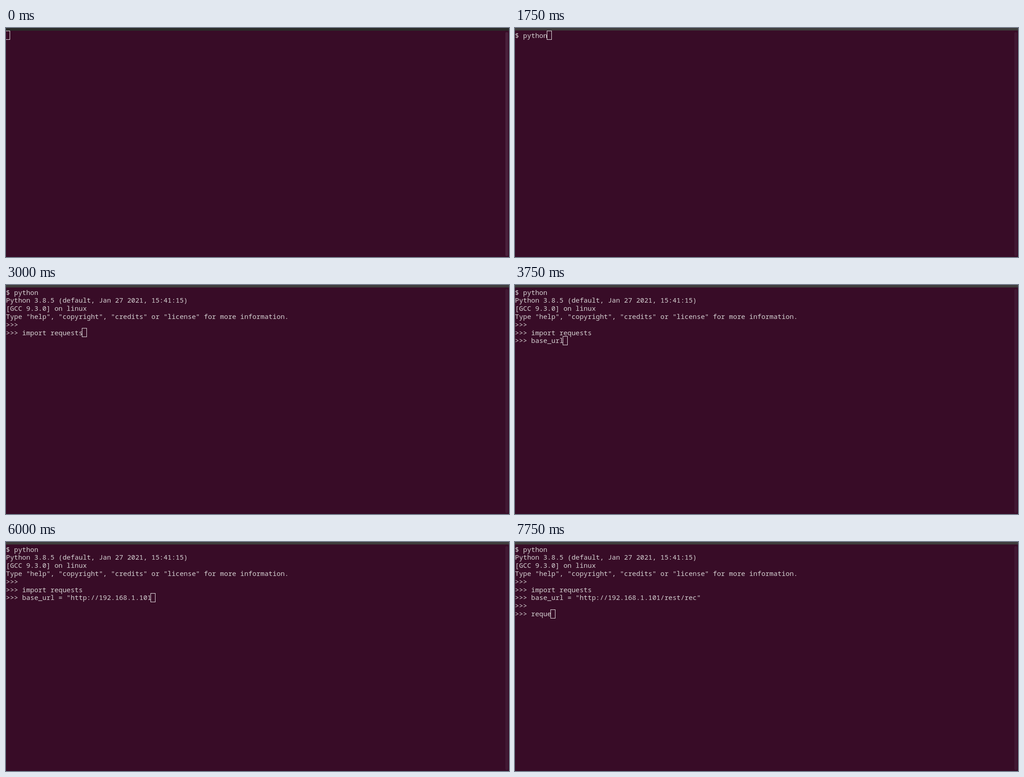
Recreate the animation shown at these times as an HTML page with a canvas. Size 1107x506 px, loop 8 s.

```html
<!DOCTYPE html>
<html lang="en">
<head>
<meta charset="utf-8">
<title>Terminal session</title>
<style>
  html, body { margin: 0; width: 100%; height: 100%; overflow: hidden; background: #380c27; }
  canvas { display: block; }
</style>
</head>
<body>
<canvas width="1107" height="506"></canvas>
<script>
const ctx = document.querySelector('canvas').getContext('2d');
const LOOP = 8000, CELL = 8.889, ROW = 17.83;

// Time in ms and the text added to the terminal at that moment
const output = [
  [1250, '$ '],
  [1750, 'python'],
  [2000, '\nPython 3.8.5 (default, Jan 27 2021, 15:41:15)\n[GCC 9.3.0] on linux\n' +
         'Type "help", "copyright", "credits" or "license" for more information.\n>>> '],
  [2250, '\n>>> '],
  [2500, 'import '],
  [2750, 'requ'],
  [3000, 'ests'],
  [3250, '\n>>> '],
  [3500, 'base'],
  [3750, '_url'],
  [4000, ' = "'],
  [4250, 'ht'],
  [4500, 'tp:'],
  [4750, '//'],
  [5000, '19'],
  [5250, '2.'],
  [5500, '168'],
  [5750, '.1.'],
  [6000, '101'],
  [6500, '/re'],
  [6750, 'st/r'],
  [7000, 'ec"'],
  [7250, '\n>>> '],
  [7500, '\n>>> '],
  [7750, 'reque']
];

function drawWindow(focused) {
  ctx.fillStyle = '#380c27';
  ctx.fillRect(0, 0, 1107, 506);
  ctx.fillStyle = focused ? '#3f3e3d' : '#2b2b2a';
  ctx.fillRect(0, 0, 1107, focused ? 5.5 : 6);
  ctx.fillStyle = focused ? '#411833' : '#4a213c';
  ctx.beginPath();
  ctx.roundRect(1099, 9, 6, 495, 3);
  ctx.fill();
}

function drawText(lines) {
  ctx.font = '14.8px "Noto Sans Mono", "DejaVu Sans Mono", monospace';
  ctx.fillStyle = '#d6d2d3';
  lines.forEach((line, row) => {
    const y = Math.round(21.5 + row * ROW);
    [...line].forEach((char, col) => ctx.fillText(char, col * CELL, y));
  });
}

function drawCursor(col, row) {
  ctx.strokeStyle = '#eeeaec';
  ctx.lineWidth = 1;
  ctx.strokeRect(Math.round(col * CELL - 0.6) - 0.5, Math.round(6 + row * ROW) + 0.5, 10, 19);
}

function frame(now) {
  const time = now % LOOP;
  const lines = output.filter(([start]) => time >= start).map(([, text]) => text).join('').split('\n');
  const row = lines.length - 1;
  drawWindow(time >= 250);
  drawText(lines);
  drawCursor(lines[row].length, row);
  requestAnimationFrame(frame);
}
frame(performance.now());
</script>
</body>
</html>
```
